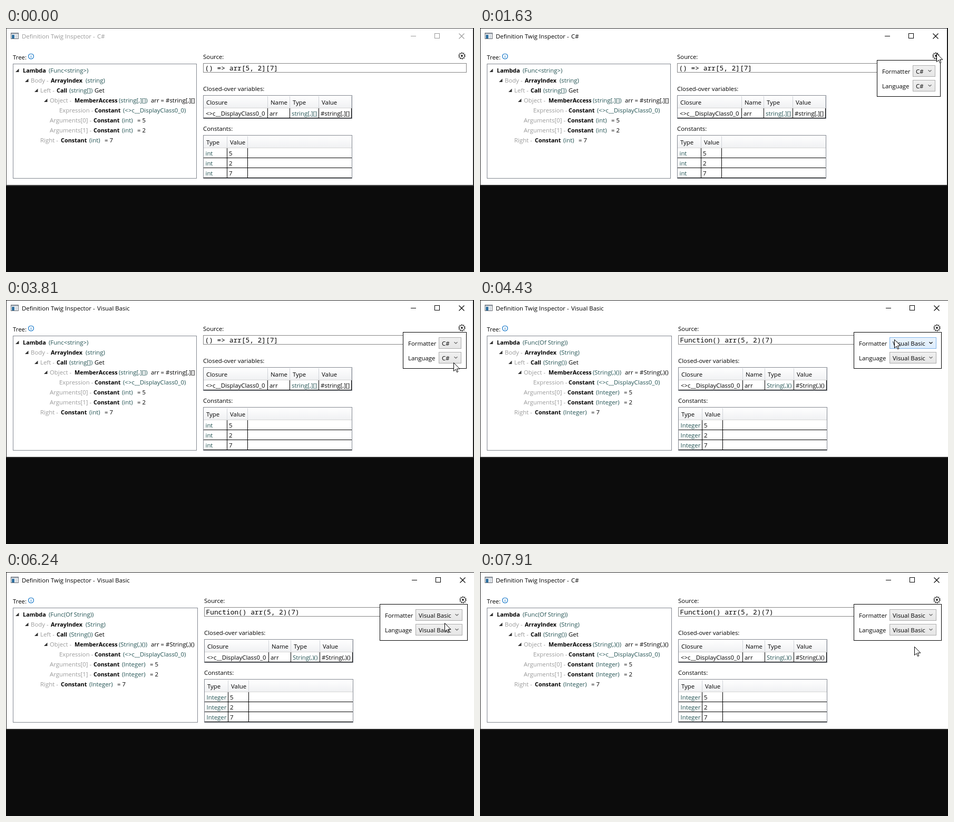
An HTML page for the animation above (7.99 s loop, 888x465 px).

```html
<!DOCTYPE html>
<html lang="en">
<head>
<meta charset="utf-8">
<title>Definition Twig Inspector</title>
<style>
  html, body { margin: 0; width: 100%; height: 100%; overflow: hidden; background: #0c0c0c; }
  svg { display: block; width: 888px; height: 465px; }
  text { font: 11.4px "Open Sans", "Noto Sans", sans-serif; fill: #000; white-space: pre; }
  .name { font-weight: 700; font-size: 10.9px; }
  .label { fill: #9a9a9a; }
  .type { fill: #225252; }
  .idle { fill: #999; }
  .code { font: 12.83px "Noto Sans Mono", "DejaVu Sans Mono", monospace; }
  rect, line { shape-rendering: crispEdges; }
</style>
</head>
<body>
<svg id="stage" viewBox="0 0 888 465">
  <defs>
    <linearGradient id="head" x2="0" y2="1"><stop stop-color="#fff"/><stop offset="1" stop-color="#f0f1f3"/></linearGradient>
    <linearGradient id="button" x2="0" y2="1"><stop stop-color="#f0f0f0"/><stop offset="1" stop-color="#e5e5e5"/></linearGradient>
    <linearGradient id="hover" x2="0" y2="1"><stop stop-color="#ecf4fc"/><stop offset="1" stop-color="#dcecfc"/></linearGradient>
    <clipPath id="reveal"><rect id="revealBox" x="700" y="93" width="188" height="66"/></clipPath>
  </defs>
  <g id="view"></g>
  <g id="pointer">
    <circle id="click" r="12" fill="#ff0" fill-opacity=".47"/>
    <path d="M.5.5V16.6L4.2 13.2L6.6 18.6L8.8 17.7L6.5 12.2H11.8Z" fill="#fff" stroke="#000"/>
  </g>
</svg>
<script>
const LOOP = 7990;
const TITLE = 'Definition Twig Inspector -';
const ITEMS = ['C#', 'Visual Basic', 'Factory methods'];
const CS = {
  dx: 0, func: 'Func<string>', str: 'string', call: 'string[]', arr: 'string[,][]', int: 'int',
  code: '() => arr[5, 2][7]', value: 29, panel: 753, combo: 821, choice: 0
};
const VB = {
  dx: 2, func: 'Func(Of String)', str: 'String', call: 'String()', arr: 'String(,)()', int: 'Integer',
  code: 'Function() arr(5, 2)(7)', value: 53, panel: 707, combo: 775, choice: 1
};

// Pointer moves: start, end, steps, x, y
const MOVES = [
  [290, 290, 1, 876, 432], [370, 450, 2, 873, 110], [780, 780, 1, 873, 50], [850, 850, 1, 856, 43],
  [930, 930, 1, 859, 50], [1250, 1410, 3, 866, 48], [2020, 2180, 3, 833, 82], [2330, 2330, 1, 833, 81],
  [2880, 3190, 5, 848, 119], [3810, 3810, 1, 849, 119], [4130, 4590, 7, 739, 42], [5060, 5380, 5, 864, 61],
  [5460, 5540, 2, 867, 53], [6000, 6240, 4, 832, 97], [6320, 6480, 3, 811, 85], [6960, 6960, 1, 811, 84],
  [7040, 7280, 4, 822, 138], [7590, 7670, 2, 824, 142]
];
const CLICKS = [[1550, 1630], [2330, 2410], [3660, 3810], [4820, 4900], [5690, 5850], [6640, 6720], [7750, 7910]];

const byId = id => document.getElementById(id);
const within = (t, a, b) => t >= a && t < b;
const escape = s => String(s).replace(/&/g, '&amp;').replace(/</g, '&lt;');
const text = (x, y, s, cls = '') => `<text x="${x}" y="${y}" class="${cls}">${escape(s)}</text>`;
const fill = (x, y, w, h, color) => `<rect x="${x}" y="${y}" width="${w}" height="${h}" fill="${color}"/>`;
const box = (x, y, w, h, stroke, color = '#fff') =>
  `<rect x="${x + .5}" y="${y + .5}" width="${w - 1}" height="${h - 1}" fill="${color}" stroke="${stroke}"/>`;
const path = (d, stroke, extra = '') => `<path d="${d}" fill="none" stroke="${stroke}" ${extra}/>`;

function pointerAt(t) {
  let x = 876, y = 432;
  for (const [start, end, steps, toX, toY] of MOVES) {
    if (t < start) break;
    const done = end > start ? Math.floor((t - start) / (end - start) * (steps - 1) + 1e-4) + 1 : 1;
    const k = Math.min(1, done / steps);
    x += (toX - x) * k;
    y += (toY - y) * k;
  }
  return { x: Math.round(x), y: Math.round(y), shown: t >= 290 && !within(t, 530, 780) };
}

function titleBar(s) {
  const ink = s.active ? '#000' : '#999';
  const cls = s.active ? '' : 'idle';
  return box(9, 9, 15, 12, '#6b7078') + fill(10, 10, 13, 2, '#aab2bc') + fill(11, 13, 5, 7, '#2f6f9f') +
    fill(17, 13, 5, 7, '#d8dde2') +
    text(30, 20, TITLE, cls) + text(173, 20, s.title, cls) +
    `<g transform="translate(${s.lang.dx})">` +
    path('M768 15.5H778M813.5 10.5H822.5V19.5H813.5Z', ink, 'shape-rendering="crispEdges"') +
    path('M859.5 10.5L869.5 20.5M869.5 10.5L859.5 20.5', ink, 'stroke-width="1.1"') + '</g>';
}

function tree(lang) {
  const row = (i, arrow, ...parts) => {
    const y = 85 + 19 * i;
    const mark = arrow ? `<path d="M${arrow} ${y - 1}H${arrow + 6.5}V${y - 7.5}Z" fill="#333"/>` : '';
    return mark + parts.map(([x, s, cls]) => text(x, y, s, cls)).join('');
  };
  const constant = (i, labelX, label, x, value) => row(i, 0, [labelX, label, 'label'], [x, 'Constant', 'name'],
    [x + 54, `(${lang.int})`, 'type'], [x + 54 + lang.value, '= ' + value]);
  return text(13, 60, 'Tree:') +
    '<circle cx="47.5" cy="54" r="5" fill="#fff" stroke="#1979c9" stroke-width="1.2"/>' +
    fill(47, 51, 1, 1, '#1979c9') + fill(47, 53, 1, 4, '#1979c9') +
    box(13, 68, 349 + lang.dx, 219, '#828790') +
    row(0, 18, [32, 'Lambda', 'name'], [81, `(${lang.func})`, 'type']) +
    row(1, 36, [47, 'Body -', 'label'], [85, 'ArrayIndex', 'name'], [151, `(${lang.str})`, 'type']) +
    row(2, 54, [65, 'Left -', 'label'], [96, 'Call', 'name'], [120, `(${lang.call})`, 'type'], [168, 'Get']) +
    row(3, 72, [83, 'Object -', 'label'], [130, 'MemberAccess', 'name'], [214, `(${lang.arr})`, 'type'],
      [275, 'arr = #' + lang.arr]) +
    row(4, 0, [101, 'Expression -', 'label'], [168, 'Constant', 'name'], [222, '(<>c__DisplayClass0_0)', 'type']) +
    constant(5, 83, 'Arguments[0] -', 166, 5) +
    constant(6, 83, 'Arguments[1] -', 166, 2) +
    constant(7, 65, 'Right -', 104, 7);
}

function grid(y, h, rows, columns) {
  let out = box(374, y, 283, h, '#828790') + fill(375, y + 1, 281, 23, 'url(#head)') +
    fill(375, y + 24, 281, 1, '#d5d5d5');
  for (const x of columns) out += fill(x, y + 2, 1, 22, '#d0d3d8') + fill(x, y + 25, 1, h - 26, '#000');
  for (let i = 1; i <= rows; i++) out += fill(375, y + 24 + 19 * i, 281, 1, '#000');
  return out;
}

function details(s) {
  const { lang } = s;
  const closure = [['Closure', '<>c__DisplayClass0_0', 380, 379], ['Name', 'arr', 502, 500],
    ['Type', lang.arr, 544, 542, 'type'], ['Value', '#' + lang.arr, 599, 597]];
  const constants = [5, 2, 7].map((n, i) =>
    text(378.5, 243 + 19 * i, lang.int, 'type') + text(423, 243 + 19 * i, n)).join('');
  return text(374, 59, 'Source:') + gear() +
    box(374, 67, 500, 18, s.sourceHover ? '#7eb4ea' : '#848484') + text(377.5, 81, lang.code, 'code') +
    text(374, 120, 'Closed-over variables:') + grid(128, 45, 1, [496, 538, 593, 655]) +
    closure.map(([head, cell, hx, cx, cls]) => text(hx, 146, head) + text(cx, 167, cell, cls)).join('') +
    text(374, 196, 'Constants:') + grid(204, 83, 3, [419, 458]) +
    text(380, 222, 'Type') + text(425, 222, 'Value') + constants;
}

function gear() {
  const ring = (r, w, extra = '') =>
    `<circle cx="865" cy="53" r="${r}" fill="none" stroke="#222" stroke-width="${w}" ${extra}/>`;
  const tooth = Math.PI * 6 / 10;
  return ring(6, 1.4, `stroke-dasharray="${tooth}"`) + ring(4.9, 1) +
    '<circle cx="865" cy="53" r="1.9" fill="#222"/>';
}

function combo(lang, y, hot) {
  const x = lang.combo;
  return box(x, y, 864 - x, 22, hot ? '#7eb4ea' : '#acacac', `url(#${hot ? 'hover' : 'button'})`) +
    text(x + 6, y + 16, ITEMS[lang.choice]) +
    path(`M850.5 ${y + 9.2}L853.5 ${y + 12}L856.5 ${y + 9.2}`, hot ? '#000' : '#666', 'stroke-width="1.2"');
}

function panel(s) {
  const { lang } = s;
  return box(lang.panel, 61, 874 - lang.panel, 70, '#000') +
    text(lang.panel + 10, 87, 'Formatter') + text(lang.panel + 10, 115, 'Language') +
    combo(lang, 71, s.formatHot) + combo(lang, 99, s.languageHot);
}

function dropdown(s) {
  const x = s.lang.combo;
  const items = ITEMS.map((item, i) =>
    (i === s.item ? box(x + 1, 94 + 20.4 * i | 0, 99, 21, '#26a0da', '#cbe8f6') : '') +
    text(x + 6, 108.5 + 20.4 * i, item)).join('');
  const shadow = [1, 2, 3].map(d => fill(x + 4, 98, 97 + d, 57 + d, 'rgba(0,0,0,.24)')).join('');
  return `<g clip-path="url(#reveal)">${shadow}${box(x, 93, 101, 62, '#707070')}${items}</g>`;
}

function view(s) {
  const edge = s.active ? '#262626' : '#484848';
  const shift = `<g transform="translate(${s.lang.dx})">`;
  return fill(0, 0, 888, 465, '#0c0c0c') + fill(0, 0, 888, 300, '#fff') +
    fill(0, 0, 888, 1, edge) + fill(0, 0, 1, 300, edge) + fill(0, 299, 888, 2, edge) +
    shift + fill(886, 0, 1, 301, edge) + fill(887, 0, 1, 301, '#0c0c0c') + '</g>' +
    titleBar(s) + tree(s.lang) +
    shift + details(s) + (s.panel ? panel(s) : '') + (s.open ? dropdown(s) : '') + '</g>';
}

function stateAt(t, pointer) {
  const lang = t < 3970 ? CS : VB;
  const { x, y } = pointer;
  const over = (top, bottom) => x >= lang.combo + lang.dx && x < 864 + lang.dx && y >= top && y < bottom;
  const shown = within(t, 1630, 4900) || t >= 5850;
  const open = within(t, 2410, 3810) || within(t, 6720, 7910);
  return {
    lang, open, panel: shown,
    active: t >= 1550,
    title: within(t, 3810, 7910) ? ITEMS[1] : ITEMS[0],
    sourceHover: within(t, 530, 610),
    formatHot: shown && over(71, 93),
    languageHot: shown && !open && t >= 3970 && over(99, 121),
    item: y >= 135 ? 2 : y >= 115 ? 1 : y >= 94 ? 0 : lang.choice
  };
}

let lastView = '';
function render(t) {
  const pointer = pointerAt(t);
  const markup = view(stateAt(t, pointer));
  if (markup !== lastView) byId('view').innerHTML = lastView = markup;

  const [start, steps] = t < 4000 ? [2410, 3] : [6720, 2];
  const revealed = Math.min(1, Math.max(0, Math.floor((t - start) / 80) + 1) / steps);
  byId('revealBox').setAttribute('height', 66 * revealed);

  byId('pointer').setAttribute('transform', `translate(${pointer.x} ${pointer.y})`);
  byId('pointer').setAttribute('visibility', pointer.shown ? 'visible' : 'hidden');
  byId('click').setAttribute('display', CLICKS.some(([a, b]) => within(t, a, b)) ? 'inline' : 'none');
}

const begin = performance.now();
function tick() {
  render((performance.now() - begin) % LOOP);
  requestAnimationFrame(tick);
}
tick();
</script>
</body>
</html>
```
